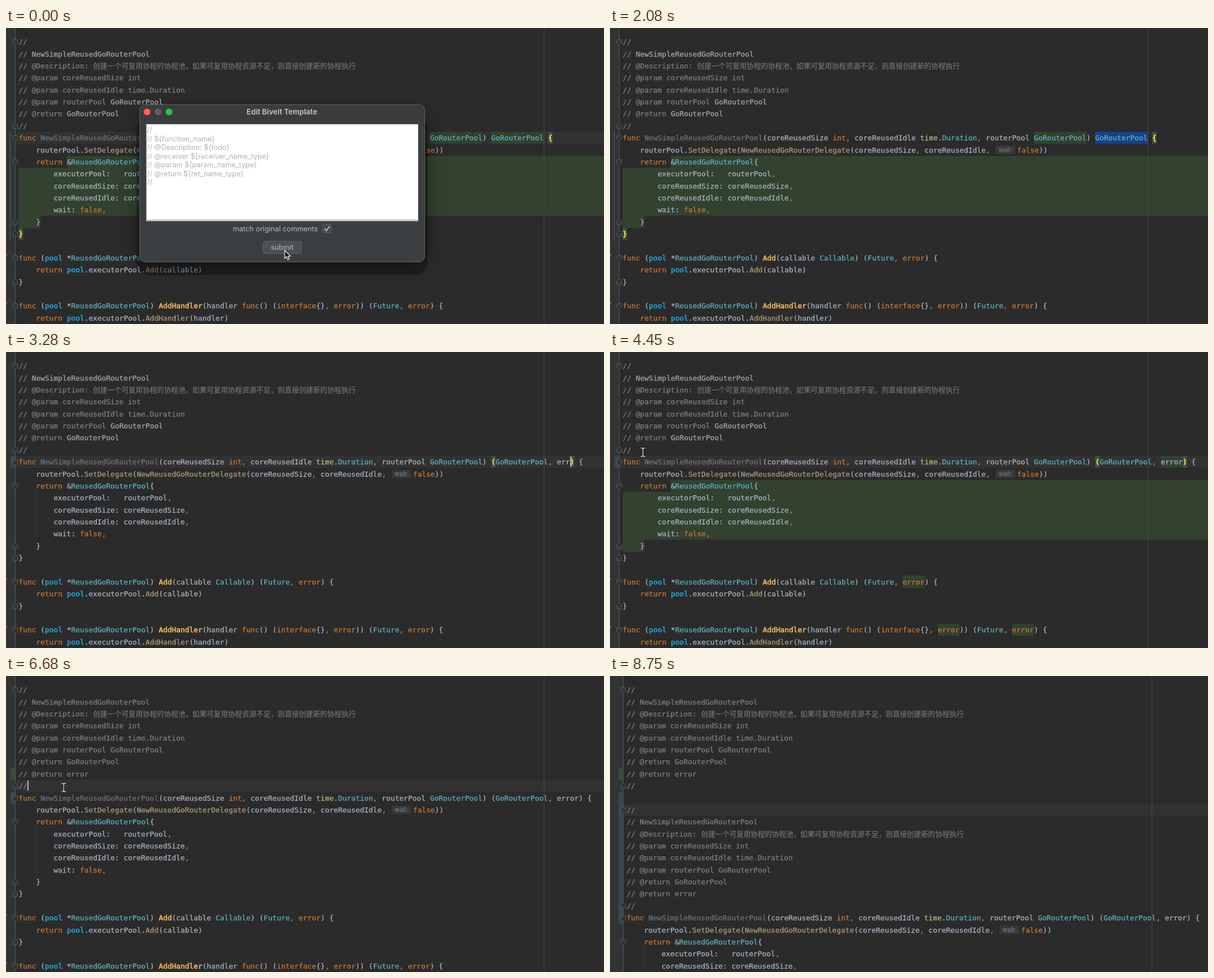
An HTML page with a canvas that plays this animation: 1062 by 527 pixels, repeating every 9.35 s.

```html
<!DOCTYPE html>
<html lang="en">
<head>
<meta charset="utf-8">
<title>Doc comment generator</title>
<style>
html, body { margin: 0; width: 100%; height: 100%; overflow: hidden; background: #2b2b2b; }
canvas { display: block; }
</style>
</head>
<body>
<canvas id="stage" width="1062" height="527"></canvas>
<script>
const ctx = document.getElementById('stage').getContext('2d');
const LOOP = 9350, CHAR = 7.77, ROW = 21.37, LEFT = 22.5, W = 1062, H = 527;
const MONO = '12.9px "DejaVu Sans Mono", monospace';
const CJK = '12.62px "Noto Sans CJK SC", "Noto Sans CJK", sans-serif';
const GREEN = '#32422f';

// Inline markup: ~<style><text>~ ; commas outside markup are orange.
const COLORS = {
  k: '#cc7832', c: '#808080', z: '#808080', i: '#a9a9a9', t: '#5fb3c0', f: '#f0b860',
  m: '#b09d79', r: '#21a5dd', p: '#afbf7e', u: '#72737a', n: '#a9b7c6'
};

// First character of a line: v fold start, ^ fold end, r fold start with red tick.
const comment = (name, withError, folds = 'v^') => [
  folds[0] + '~c//~',
  ` ~c// ~~${name}NewSimpleReusedGoRouterPool~`,
  ' ~c// @Description: ~~z创建一个可复用协程的协程池，如果可复用协程资源不足，则直接创建新的协程执行~',
  ' ~c// @param coreReusedSize int~',
  ' ~c// @param coreReusedIdle time.Duration~',
  ` ~c// @param routerPool ~~${name}GoRouterPool~`,
  ` ~c// @return ~~${name}GoRouterPool~`,
  ...(withError ? [' ~c// @return error~'] : []),
  folds[1] + '~c//~'
];

const code = result => [
  'v~kfunc~ ~uNewSimpleReusedGoRouterPool~(coreReusedSize ~kint~, coreReusedIdle ~ptime~.~tDuration~, routerPool ~tGoRouterPool~) ' + result + ' {',
  '     routerPool.~mSetDelegate~(~mNewReusedGoRouterDelegate~(coreReusedSize, coreReusedIdle, ~h~~kfalse~))',
  'v    ~kreturn~ &~tReusedGoRouterPool~{',
  '         executorPool:   routerPool,',
  '         coreReusedSize: coreReusedSize,',
  '         coreReusedIdle: coreReusedIdle,',
  '         wait: ~kfalse~,',
  '^    }',
  '^}',
  ' ',
  'r~kfunc~ (~rpool~ *~tReusedGoRouterPool~) ~fAdd~(callable ~tCallable~) (~tFuture~, ~kerror~) {',
  '     ~kreturn~ ~rpool~.executorPool.~mAdd~(callable)',
  '^}',
  ' ',
  'r~kfunc~ (~rpool~ *~tReusedGoRouterPool~) ~fAddHandler~(handler ~kfunc~() (~kinterface~{}, ~kerror~)) (~tFuture~, ~kerror~) {',
  '     ~kreturn~ ~rpool~.executorPool.~mAddHandler~(handler)'
];

const colX = col => LEFT + col * CHAR;
const midY = line => 24.5 + line * ROW;
const topY = line => Math.round(midY(line) - ROW / 2);
const during = (t, from, to) => t >= from && t < to;

function rect(x, y, w, h, color) {
  ctx.fillStyle = color;
  ctx.fillRect(x, y, w, h);
}

function rounded(x, y, w, h, r, fill, stroke) {
  ctx.beginPath();
  ctx.roundRect(x, y, w, h, r);
  ctx.fillStyle = fill;
  ctx.fill();
  if (stroke) { ctx.strokeStyle = stroke; ctx.stroke(); }
}

function label(text, x, y, color, font, align = 'left') {
  ctx.font = font;
  ctx.fillStyle = color;
  ctx.textAlign = align;
  ctx.fillText(text, x, y);
}

// Code text, slightly heavier than the plain font.
function codeText(text, x, y, color, weight = 0.25) {
  label(text, x, y, color, MONO);
  ctx.strokeStyle = color;
  ctx.lineWidth = weight;
  ctx.strokeText(text, x, y);
  ctx.lineWidth = 1;
}

function path(points, close) {
  ctx.beginPath();
  points.forEach(([x, y]) => ctx.lineTo(x, y));
  if (close) ctx.closePath();
}

function strokePath(points, color, width = 1, close = false) {
  path(points, close);
  ctx.strokeStyle = color;
  ctx.lineWidth = width;
  ctx.stroke();
  ctx.lineWidth = 1;
}

// Fills a row band from one column to another, or to the right edge.
function band(line, from, to, color) {
  const x = colX(from), y = topY(line);
  rect(x, y, (to === undefined ? W : colX(to)) - x, topY(line + 1) - y, color);
}

function brace(line, col, char) {
  band(line, col, col + 1, '#3b514d');
  codeText(char, colX(col), midY(line) + 4.7, '#ffef28', 0.7);
}

function drawFold(mark, line) {
  if (mark === ' ') return;
  const dir = mark === '^' ? -1 : 1, y = midY(line) + (dir > 0 ? 1 : 0);
  const shape = [[12.5, -4.5], [20.5, -4.5], [20.5, 1.5], [16.5, 5.5], [12.5, 1.5]];
  const points = shape.map(([x, dy]) => [x, y + dir * dy]);
  path(points, true);
  ctx.fillStyle = '#2b2b2b';
  ctx.fill();
  strokePath(points, '#606366', 1, true);
  strokePath([[14.5, y - dir], [18.5, y - dir]], '#606366');
  if (mark === 'r') strokePath([[-1, y - 4], [2, y - 7]], '#d05050', 1.5);
}

function drawLine(source, line) {
  const y = midY(line) + 4.7;
  let x = LEFT;
  for (const part of source.slice(1).split(/(~[^~]+~|,)/)) {
    if (!part) continue;
    if (part === '~h~') {
      rounded(x + 2, y - 12, 35, 15, 3, '#383838');
      label('wait:', x + 7, y - 1, '#808080', '11px Inter, sans-serif');
      x += 40;
      continue;
    }
    const tagged = part[0] === '~';
    const style = tagged ? part[1] : part === ',' ? 'k' : 'n';
    const text = tagged ? part.slice(2, -1) : part;
    if (style === 'z') label(text, x, y, COLORS.z, CJK);
    else codeText(text, x, y, COLORS[style], 'rf'.includes(style) ? 0.6 : 0.25);
    x += text.length * CHAR;
  }
  if (source.startsWith('         ')) {
    rect(Math.round(colX(4)) - 1, topY(line), 1, ROW + 1, '#393939');
  }
}

// Text typed after the first return type.
function typedResult(t) {
  if (t < 2830) return '';
  return ', ' + 'error'.slice(0, Math.max(0, Math.floor((t - 2830) / 148 + 0.05)));
}

function documentLines(t) {
  const result = t < 2680 ? '~tGoRouterPool~' : `(~tGoRouterPool~${typedResult(t)})`;
  if (t < 5790) return [...comment('i', false), ...code(result)];
  const added = t < 6970 ? [] : t < 7120 ? [' '] : t < 7570 ? [' ', ' ']
    : [' ', ...comment('c', true, t < 7860 ? '  ' : 'v^')];
  return [...comment('c', true), ...added, ...code(result)];
}

function drawHighlights(t) {
  const caretRow = line => band(line, -0.7, undefined, '#323232');
  if (t < 1630 || during(t, 2680, 4606) || during(t, 5790, 6970)) caretRow(8);
  if (during(t, 4606, 4753)) caretRow(7);
  if (t >= 6970) caretRow(t < 7120 ? 9 : 10);

  if (t < 1630 || during(t, 2080, 2680) || during(t, 3720, 4606)) {
    band(10, 11, undefined, GREEN);
    for (let line = 11; line < 15; line++) band(line, 0, undefined, GREEN);
    band(15, 0, 5, GREEN);
  }
  if (t < 2680) {
    band(8, 94, 106, GREEN);
    band(8, 108, 120, GREEN);
  }
  if (during(t, 1630, 2680)) band(8, 108, 120, '#18428a');
  if (during(t, 3720, 4606)) {
    for (const [line, col] of [[8, 123], [18, 64], [22, 72], [22, 89]]) band(line, col, col + 5, GREEN);
  }
  if (during(t, 4753, 5790)) {
    for (let line = t < 4900 ? 4 : t < 5040 ? 1 : 0; line < 7; line++) band(line, 0, undefined, '#18428a');
    band(7, 0, 2, '#18428a');
  }
}

function drawGutter(t, lines) {
  const bar = (from, to, color) => rect(8, topY(from), 9, topY(to) - topY(from), color);
  rect(-7, 0, 23, H, '#313335');
  if (t >= 5790) bar(7, 8, '#384c38');
  if (t >= 2680) {
    const func = lines.findIndex(line => line.startsWith('v~kfunc'));
    bar(t >= 5790 ? 9 : func, func + 1, '#374752');
  }
  rect(16, 0, 1, H, '#555555');
  if (t < 2680) rect(7, topY(8), 1, topY(17) - topY(8), '#606366');
  lines.forEach((line, i) => drawFold(line[0], i));
}

function drawCaret(t) {
  if (!(during(t, 1180, 1630) || during(t, 2680, 4017) || during(t, 5790, 6238) || during(t, 6533, 7570))) return;
  let line = 8, col = 120;
  if (t >= 7120) [line, col] = [10, 0];
  else if (t >= 6970) [line, col] = [9, 0];
  else if (t >= 5790) col = 2;
  else if (t >= 2680) col = 121 + typedResult(t).length;
  rect(Math.round(colX(col)), topY(line) + 1, 2, 18, '#bbbbbb');
}

function drawEditor(t) {
  const lines = documentLines(t);
  ctx.save();
  if (t >= 7570) ctx.translate(7, 0);
  drawHighlights(t);
  rect(955, 0, 1, H, '#484848');
  drawGutter(t, lines);
  lines.slice(0, 24).forEach(drawLine);
  if (t < 2680) {
    brace(8, 121, '{');
    brace(16, 0, '}');
  } else if (t < 4606) {
    brace(8, 108, '(');
    brace(8, 121 + typedResult(t).length, ')');
  }
  drawCaret(t);
  ctx.restore();
}

function drawDialog(pressed) {
  const ui = '12.7px Inter, sans-serif';
  ctx.save();
  ctx.shadowColor = 'rgba(0,0,0,.45)';
  ctx.shadowBlur = 36;
  ctx.shadowOffsetY = 6;
  rounded(237.5, 150, 506, 266, 10, '#3c3f41');
  ctx.restore();
  rounded(232, 158, 517, 282, 25, 'rgba(0,0,0,.28)');
  rounded(237.5, 136.5, 506, 280, 10, '#3c3f41', '#5f6163');
  rounded(238, 137, 505, 26, [10, 10, 0, 0], '#3a3b3d');
  [[250.5, '#fe5f57'], [270, '#5d5e60'], [289.5, '#28c840']].forEach(([x, color]) => rounded(x - 6, 143.5, 12, 12, 6, color));
  label('Edit Bivelt Template', 490, 153.5, '#b9babb', 'bold 13px Inter, sans-serif', 'center');

  rect(249, 171, 483, 173, '#c4c4c4');
  rect(250, 172, 482, 169, '#ffffff');
  ['//', '// ${function_name}', '// @Description: ${todo}', '// @receiver ${receiver_name_type}',
    '// @param ${param_name_type}', '// @return ${ret_name_type}', '//']
    .forEach((text, i) => label(text, 250.5, 186.3 + i * 15.5, '#b2b2b2', ui));

  label('match original comments', 403, 362, '#bbbbbb', ui);
  rounded(562.5, 349.5, 15, 15, 3, '#43494a', '#3d6c98');
  strokePath([[566, 357], [569, 361], [574.5, 353]], '#c0c0c0', 2);
  rounded(456.5, 379.5, 68, 22, 3, pressed ? '#5a5f61' : '#4c5052', '#5e6060');
  label('submit', 490.5, 395, '#bbbbbb', ui, 'center');
}

// Pointer tracks: lists of [time, x, y]; the pointer is hidden between tracks.
const TRACKS = [
  [[0, 495, 396], [297, 495, 396], [1180, 945, 215], [1330, 958, 192], [1480, 961, 196], [1630, 866, 196], [2080, 866, 196]],
  [[3870, 860, 200], [4450, 58, 178], [4606, 58, 178], [4753, 44, 112], [4900, 26, 44],
    [5040, 20, 17], [6090, 20, 17], [6680, 102, 198], [6970, 102, 198]],
  [[7860, 112, 224], [8750, 522, 262]]
];

function pointerAt(t) {
  const track = TRACKS.find(keys => during(t, keys[0][0], keys.at(-1)[0]));
  if (!track) return null;
  const next = track.findIndex(key => key[0] > t);
  const [t0, x0, y0] = track[next - 1], [t1, x1, y1] = track[next];
  const p = Math.min(1, Math.floor((t - t0) / 148 + 0.05) * 148 / (t1 - t0));
  return [x0 + (x1 - x0) * p, y0 + (y1 - y0) * p];
}

function drawPointer(t) {
  const at = pointerAt(t);
  if (!at) return;
  ctx.save();
  ctx.translate(Math.round(at[0]), Math.round(at[1]));
  if (t < 444 || at[0] < 22) {
    const arrow = [[0, 0], [0, 14], [3.3, 11], [5.7, 16.5], [8, 15.5], [5.7, 10.3], [10, 10]];
    path(arrow, true);
    ctx.fillStyle = '#000';
    ctx.fill();
    strokePath(arrow, '#fff', 1.2, true);
  } else {
    for (const [color, width] of [['#111', 3], ['#eee', 1.3]]) {
      strokePath([[-3, -7], [-1, -7], [0.5, -5.5], [2, -7], [4, -7]], color, width);
      strokePath([[-3, 8], [-1, 8], [0.5, 6.5], [2, 8], [4, 8]], color, width);
      strokePath([[0.5, -5.5], [0.5, 6.5]], color, width);
    }
  }
  ctx.restore();
}

const start = performance.now();
function frame() {
  const t = (performance.now() - start) % LOOP;
  rect(0, 0, W, H, '#2b2b2b');
  drawEditor(t);
  if (t < 297) drawDialog(t >= 150);
  drawPointer(t);
  requestAnimationFrame(frame);
}
frame();
</script>
</body>
</html>
```
